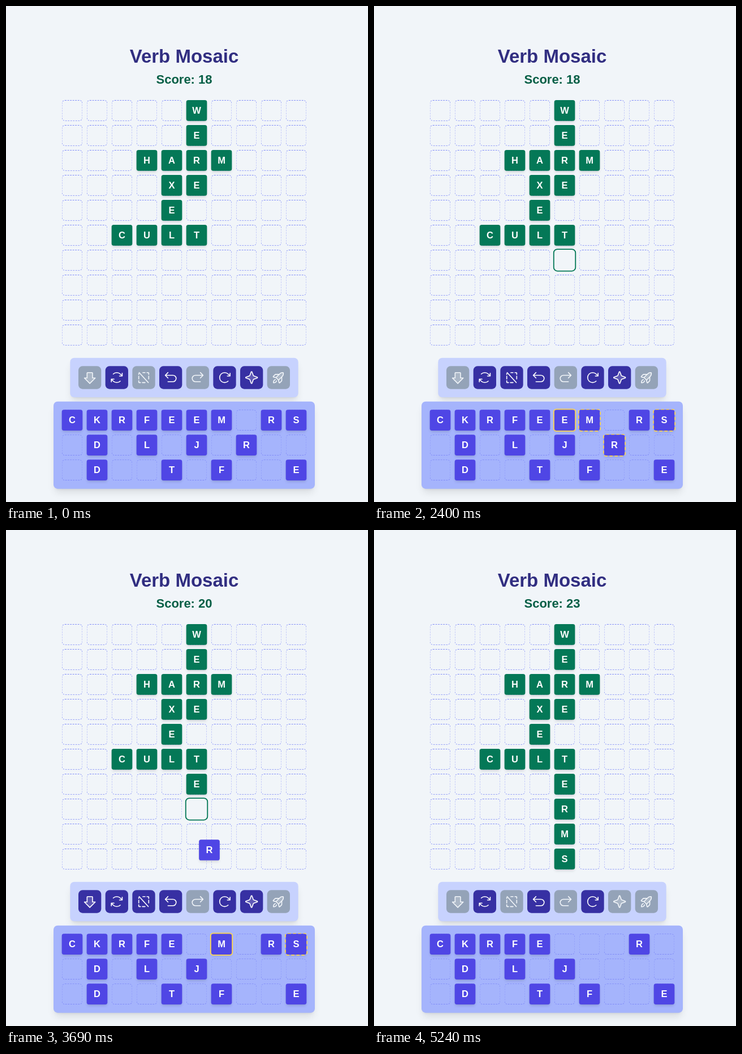
These frames come from a looping animation (640x875 px, 6440 ms). An HTML page:

```html
<!DOCTYPE html>
<html lang="en">
<head>
<meta charset="utf-8">
<title>Verb Mosaic</title>
<style>
  html, body { margin: 0; width: 100%; height: 100%; overflow: hidden; background: #f1f5f9; }
  #game {
    position: absolute; left: 0; top: 0; width: 472px; height: 764px;
    transform-origin: 0 0; transform: translate(98.67px, 166px) scale(.916667);
    font-family: "Liberation Sans", Arial, sans-serif;
  }
  #game > *, .bar > * { position: absolute; box-sizing: border-box; }
  h1, h2 { margin: 0; left: 0; width: 100%; text-align: center; font-weight: 700; white-space: nowrap; }
  h1 { top: -104px; font-size: 36px; line-height: 40px; color: #312e81; }
  h2 { top: -56px; font-size: 24px; line-height: 32px; color: #065f46; }
  .bar {
    border-radius: 8px;
    box-shadow: 0 10px 15px -3px rgba(0,0,0,.1), 0 4px 6px -4px rgba(0,0,0,.1);
  }
  #tools { left: 16px; top: 496px; width: 440px; height: 76px; background: #c7d2fe; }
  #rack { left: -16px; top: 580px; width: 504px; height: 168px; background: #a5b4fc; }
  .btn { top: 16px; width: 44px; height: 44px; border-radius: 8px; background: #3730a3; }
  .btn.off { background: #94a3b8; }
  .btn svg {
    position: absolute; left: 8px; top: 8px; width: 28px; height: 28px;
    fill: none; stroke: #fff; stroke-width: 16; stroke-linecap: round; stroke-linejoin: round;
  }
  .btn.off svg { stroke: #f1f5f9; }
  .duo { fill: rgba(255,255,255,.2); }
  .cell { width: 40px; height: 40px; border: 1px dashed #818cf8; border-radius: 6px; }
  .cell.aim { border-color: transparent; outline: 2px solid #047857; }
  .cell.aim.low { outline-color: #4f46e5; }
  .tile {
    width: 40px; height: 40px; border-radius: 4px; background: #4f46e5; color: #fff;
    font-size: 18px; font-weight: 600; line-height: 40px; text-align: center;
    box-shadow: 0 4px 6px -1px rgba(0,0,0,.1), 0 2px 4px -2px rgba(0,0,0,.1);
  }
  .tile.set { background: #047857; }
  .tile.next { outline: 2px solid #fcd34d; }
  .tile.queued { outline: 2px dashed #fcd34d; }
</style>
</head>
<body>
<div id="game">
  <h1>Verb Mosaic</h1>
  <h2 id="score">Score: 18</h2>
  <div id="tools" class="bar"></div>
  <div id="rack" class="bar"></div>
</div>
<script>
const LOOP = 6440, FLIGHT = 300, PITCH = 48, RACK_Y = 596;
const game = document.getElementById('game');
const score = document.getElementById('score');

function add(parent, cls, x, y, html = '') {
  const el = document.createElement('div');
  el.className = cls;
  el.style.left = x + 'px';
  if (y !== null) el.style.top = y + 'px';
  el.innerHTML = html;
  parent.appendChild(el);
  return el;
}

// Toolbar icons on a 256 grid; a leading * marks a tinted shape.
const icons = [
  ['*M32 136 128 232 224 136H176V48a8 8 0 0 0-8-8H88a8 8 0 0 0-8 8v88Z'],
  ['M176 100h48V52M65.8 65.8a88 88 0 0 1 124.4 0L224 99.7',
   'M80 156H32v48M190.2 190.2a88 88 0 0 1-124.4 0L32 156.3'],
  ['M48 40 208 216M40 104v48M216 104v48M104 216h48M112 40h40M40 72V56',
   'M184 40h24a8 8 0 0 1 8 8v24M72 216H48a8 8 0 0 1-8-8v-24'],
  ['M80 136 32 88 80 40M80 200h88a56 56 0 0 0 0-112H32'],
  ['M176 136 224 88 176 40M176 200H88a56 56 0 0 1 0-112H224'],
  ['M176 100h48V52M190.2 190.2a88 88 0 1 1 0-124.4L224 99.7'],
  ['*M120.5 29.2a8 8 0 0 1 15 0l22.7 61.5a12 12 0 0 0 7.1 7.1l61.5 22.7a8 8 0 0 1 0 15' +
   'l-61.5 22.7a12 12 0 0 0-7.1 7.1l-22.7 61.5a8 8 0 0 1-15 0l-22.7-61.5' +
   'a12 12 0 0 0-7.1-7.1l-61.5-22.7a8 8 0 0 1 0-15l61.5-22.7a12 12 0 0 0 7.1-7.1Z'],
  ['*M195.9 105.4 128 173.3 82.7 128l67.9-67.9c18.2-18.1 40-20 54.6-18.2a9.5 9.5 0 0 1 8 8c1.9 14.6-.1 36.4-17.3 55.5Z',
   'M94.1 184.6c-11.4 33.9-56.6 33.9-56.6 33.9s0-45.2 33.9-56.6',
   'M184.6 116.7v64.6a8 8 0 0 1-2.4 5.6l-32.3 32.4a8 8 0 0 1-13.5-4.1L128 173.3',
   'M139.3 71.4H74.7a8 8 0 0 0-5.6 2.4l-32.4 32.3a8 8 0 0 0 4.1 13.5L82.7 128']
];
const tools = document.getElementById('tools');
const buttons = icons.map((parts, i) => {
  const paths = parts.map(d => d[0] === '*'
    ? `<path class="duo" d="${d.slice(1)}"/>` : `<path d="${d}"/>`).join('');
  return add(tools, 'btn', 16 + i * 52, null, `<svg viewBox="0 0 256 256">${paths}</svg>`);
});
const [drop, , clear, , redo, , star, launch] = buttons;

function makeCells(rows, top, cls) {
  return Array.from({ length: rows * 10 }, (_, i) =>
    add(game, cls, i % 10 * PITCH, top + Math.floor(i / 10) * PITCH));
}
const board = makeCells(10, 0, 'cell');
const slots = makeCells(3, RACK_Y, 'cell low');

// Letters that change place: rack position, pick time, take-off, landing.
const moves = [
  { ch: 'E', col: 5, row: 0, pick: 70, leave: 2740, go: 2805, land: 3150, score: 20 },
  { ch: 'R', col: 7, row: 1, pick: 800, leave: 3550, go: 3548, land: 3900, score: 21 },
  { ch: 'M', col: 6, row: 0, pick: 1260, leave: 4230, go: 4228, land: 4570, score: 22 },
  { ch: 'S', col: 9, row: 0, pick: 2000, leave: 4900, go: 4898, land: 5240, score: 23 }
];

function placeRows(rows, top, cls) {
  rows.forEach((line, r) => [...line].forEach((ch, c) => {
    if (ch !== ' ') add(game, cls, c * PITCH, top + r * PITCH, ch);
  }));
}
placeRows(['     W', '     E', '   HARM', '    XE', '    E', '  CULT'], 0, 'tile set');
placeRows(['CKRFE   R', ' D L J', ' D  T F  E'], RACK_Y, 'tile');
moves.forEach((m, i) => {
  m.x0 = m.col * PITCH;
  m.y0 = RACK_Y + m.row * PITCH;
  m.x1 = 5 * PITCH;
  m.y1 = (6 + i) * PITCH;
  m.el = add(game, 'tile', m.x0, m.y0, m.ch);
});

// Cells under the pointer on its way to the landing column.
const hovers = [[2130, 7, 9], [2200, 6, 8], [2330, 6, 7], [2400, 5, 6]];

const clamp = v => Math.max(0, Math.min(1, v));

// cubic-bezier(.4, 0, .2, 1)
function ease(x) {
  let lo = 0, hi = 1, s = x;
  for (let i = 0; i < 24; i++) {
    s = (lo + hi) / 2;
    const u = 1 - s;
    if (1.2 * u * u * s + 0.6 * u * s * s + s * s * s < x) lo = s; else hi = s;
  }
  return s * s * (3 - 2 * s);
}

function aimAt(t) {
  const landed = moves.filter(m => t >= m.land).length;
  if (landed === moves.length) return -1;
  if (landed) return (6 + landed) * 10 + 5;
  const h = hovers.filter(p => t >= p[0]).pop();
  return h ? h[2] * 10 + h[1] : -1;
}

function render(t) {
  const first = moves.find(m => t < m.leave);
  let points = 18;
  for (const m of moves) {
    const p = ease(clamp((t - m.go) / FLIGHT));
    const x = m.x0 + (m.x1 - m.x0) * p, y = m.y0 + (m.y1 - m.y0) * p;
    m.el.style.transform = t < m.leave ? 'none' : `translate(${x - m.x0}px, ${y - m.y0}px)`;
    const picked = t >= m.pick && t < m.leave;
    m.el.className = 'tile' + (t >= m.land ? ' set' : picked ? (m === first ? ' next' : ' queued') : '');
    if (t >= m.land) points = m.score;
  }
  score.textContent = 'Score: ' + points;

  const aim = aimAt(t);
  board.forEach((c, i) => c.classList.toggle('aim', i === aim));
  slots[16].classList.toggle('aim', t >= 330 && t < 400);

  const flying = moves.some(m => t >= m.leave && t < m.land);
  drop.classList.toggle('off', !flying);
  clear.classList.toggle('off', t < 70 || !first);
  star.classList.toggle('off', t >= 5240);
  redo.classList.add('off');
  launch.classList.add('off');
}

const start = performance.now();
function tick() {
  render((performance.now() - start) % LOOP);
  requestAnimationFrame(tick);
}
render(0);
requestAnimationFrame(tick);
</script>
</body>
</html>
```
